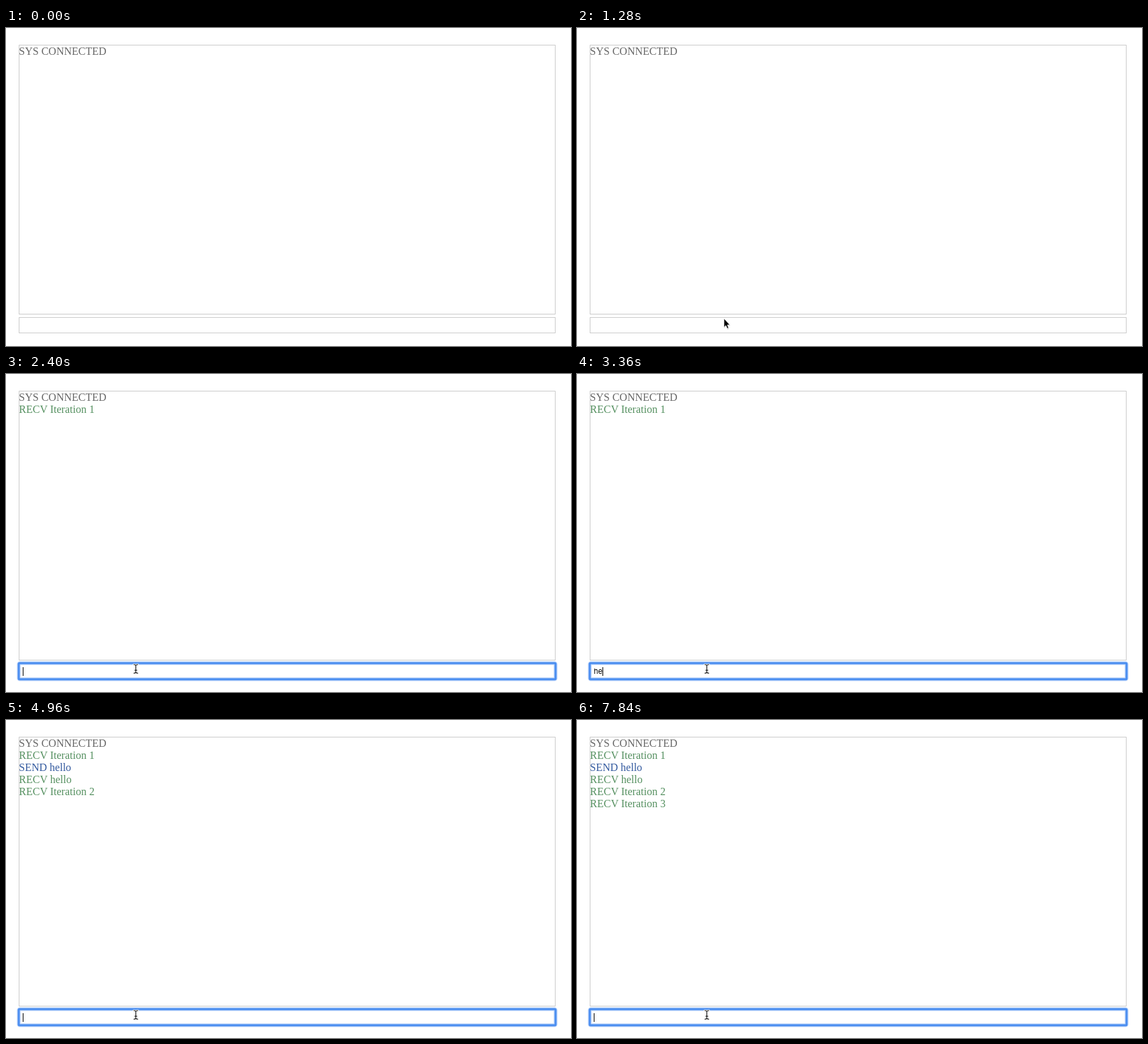
Recreate the animation shown at these times as an HTML page. Size 842 by 474 pixels, loop 8 s.

```html
<!DOCTYPE html>
<html lang="en">
<head>
<meta charset="utf-8">
<title>Socket console</title>
<style>
  html, body { margin: 0; width: 100%; height: 100%; overflow: hidden; background: #fff; }
  svg { display: block; width: 842px; height: 474px; }
  .log { font: 16px "Liberation Serif", serif; }
  .sys { fill: #666; }
  .recv { fill: #559060; }
  .send { fill: #335a9f; }
  .box { fill: none; stroke: #ccc; }
  #typed { font: 11px Inter, sans-serif; fill: #000; }
</style>
</head>
<body>
<svg viewBox="0 0 842 474">
  <rect class="box" x="19.5" y="25.5" width="799" height="401"/>
  <rect class="box" x="19.5" y="431.5" width="799" height="23"/>
  <g id="log" class="log"></g>
  <g id="focus" fill="none" stroke="#4a8df0">
    <rect x="19" y="431" width="800" height="24" rx="1.5" stroke-width="5.5" opacity=".35"/>
    <rect x="19" y="431" width="800" height="24" rx="1" stroke-width="3"/>
  </g>
  <text id="typed" x="25" y="447"></text>
  <rect id="caret" x="25" y="437" width="1" height="13"/>
  <circle id="ring" cx="193.5" cy="439" fill="#fff" fill-opacity=".8" stroke="#000"/>
  <g id="arrow">
    <path d="M0 1V14.5L3 11.6 5 16.5 7.6 15.4 5.6 10.8H9.6Z" fill="#000" opacity=".18"/>
    <path d="M0 0V13.2L2.9 10.5 4.9 15 7 14.1 5.1 9.7H9Z" stroke="#fff" stroke-width=".8"/>
  </g>
  <g id="beam" fill="none" stroke-linecap="round">
    <path id="beamShape" d="M-3-6.5Q-.5-6.5 0-5Q.5-6.5 3-6.5M0-5V5M-3 6.5Q-.5 6.5 0 5Q.5 6.5 3 6.5M-1.5 2H1.5" stroke="#fff" stroke-width="2.6"/>
    <use href="#beamShape" style="stroke:#000"/>
    <path d="M-3-6.5Q-.5-6.5 0-5Q.5-6.5 3-6.5M0-5V5M-3 6.5Q-.5 6.5 0 5Q.5 6.5 3 6.5M-1.5 2H1.5" stroke="#111" stroke-width="1.1"/>
  </g>
</svg>
<script>
const LOOP = 8000, STEP = 160;
const $ = id => document.getElementById(id);

const lines = [
  [0, "sys", "SYS CONNECTED"],
  [1760, "recv", "RECV Iteration 1"],
  [4000, "send", "SEND hello"],
  [4000, "recv", "RECV hello"],
  [4800, "recv", "RECV Iteration 2"],
  [7680, "recv", "RECV Iteration 3"]
].map(([start, kind, text], i) => {
  const node = document.createElementNS("http://www.w3.org/2000/svg", "text");
  node.setAttribute("x", 19.3);
  node.setAttribute("y", 40 + 18 * i);
  node.setAttribute("class", kind);
  node.textContent = text;
  $("log").append(node);
  return { start, node };
});

// Pointer positions, one per step
const ARROW_START = 320, BEAM_START = 1440, FOCUS = 2400;
const arrowPath = [[390, 9], [338, 118], [278, 240], [228, 342], [199, 397], [204, 421], [219, 433]];
const beamPath = [[214, 437], [207, 440], [200, 441], [195.5, 440], [193.5, 439.5]];

const typing = [[3200, "h"], [3360, "he"], [3520, "hell"], [3680, "hello"], [4000, ""]];

const show = (node, on) => node.style.display = on ? "" : "none";
const place = (node, [x, y]) => node.setAttribute("transform", `translate(${x} ${y})`);
const at = (path, start, t) =>
  path[Math.max(0, Math.min(path.length - 1, (t - start) / STEP))];

function caretOn(t) {
  if (t < FOCUS) return false;
  if (t < 3200) return t < 2720;
  return t < 4000 || Math.floor((t - 4000) / 480) % 2 === 0;
}

function draw(t) {
  for (const { start, node } of lines) show(node, t >= start);

  show($("arrow"), t >= ARROW_START && t < BEAM_START);
  place($("arrow"), at(arrowPath, ARROW_START, t));
  show($("beam"), t >= BEAM_START);
  place($("beam"), at(beamPath, BEAM_START, t));

  show($("ring"), t >= 2080 && t < FOCUS);
  $("ring").setAttribute("r", t < 2240 ? 24.5 : 16.5);
  show($("focus"), t >= FOCUS);

  const value = typing.reduce((text, [start, next]) => t >= start ? next : text, "");
  $("typed").textContent = value;
  const width = value ? $("typed").getComputedTextLength() : 0;
  $("caret").setAttribute("x", 25 + Math.round(width));
  show($("caret"), caretOn(t));
}

const origin = performance.now();
function tick() {
  const t = (performance.now() - origin) % LOOP;
  draw(Math.floor(t / STEP) * STEP);
  requestAnimationFrame(tick);
}
tick();
</script>
</body>
</html>
```
